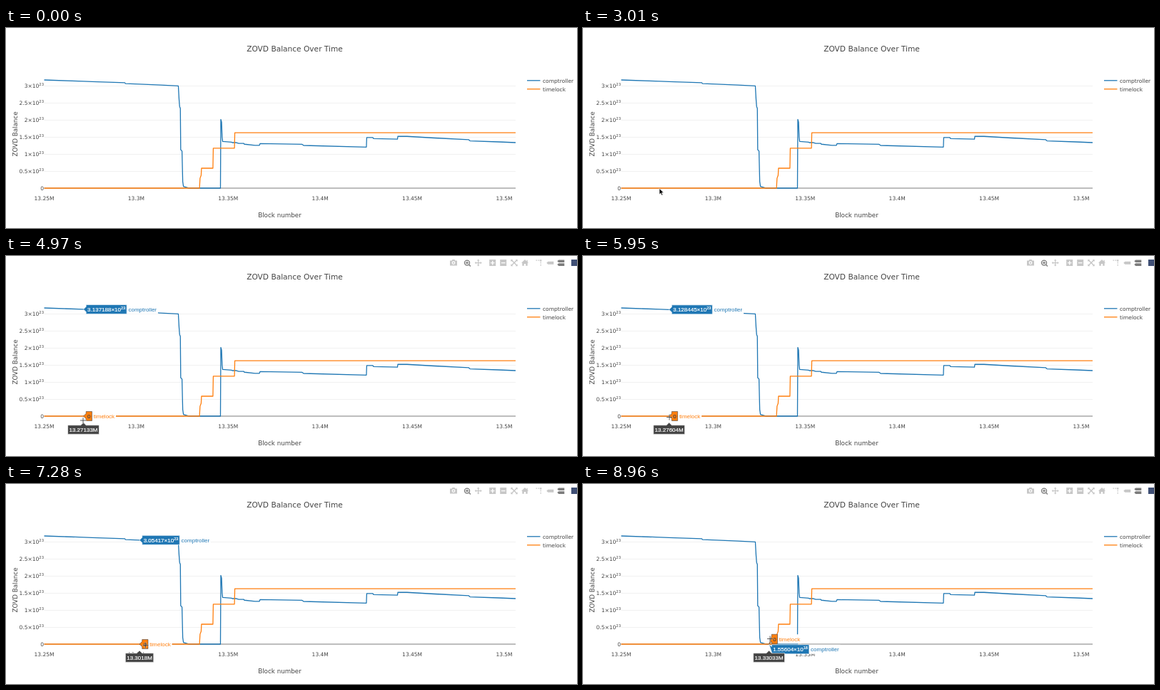
An HTML page that plays this animation: 800x281 px, repeating every 9.03 s.

```html
<!DOCTYPE html>
<html lang="en">
<head>
<meta charset="utf-8">
<title>Balance chart</title>
<style>
  html, body { margin: 0; width: 100%; height: 100%; overflow: hidden; background: #fff; }
  svg { display: block; width: 100%; height: 100%; }
  text { font: 7.5px "DejaVu Sans", sans-serif; fill: #444; white-space: pre; }
  .axis { font-size: 8.75px; }
  .title { font-size: 10.6px; }
  .hover text { font: 8px "Liberation Sans", Arial, sans-serif; }
  .sup { font-size: 70%; }
  .line { fill: none; stroke-width: 1.3; stroke-linejoin: round; }
</style>
</head>
<body>
<svg id="stage" viewBox="0 0 800 281"></svg>
<script>
const LOOP = 9030, STEP = 70, HOVER_START = 4760;
const BLUE = '#1f77b4', ORANGE = '#ff7f0e', DARK = '#444';
const stage = document.getElementById('stage');

// Points are [thousands of blocks after 13.25M, balance / 1e23].
const comptroller = [
  [0, 3.177], [21.33, 3.137188], [26.04, 3.128445], [43.8, 3.095], [44.2, 3.068],
  [51.8, 3.05417], [63.43, 3.029263], [72.9, 3], [73.3, 2.61], [73.6, 2.4],
  [74, 2.34], [74.2, 1.13], [74.9, 1.09], [75.3, .19], [75.7, .05], [77, .03],
  [78.6, 1.6e-5], [80.33, 1.55604e-5], [95.8, 0], [96, 2.02], [96.4, 1.94],
  [96.7, 1.5], [97, 1.37], [101.8, 1.352], [102.2, 1.337], [104.2, 1.34],
  [105.7, 1.316], [108.4, 1.316], [108.8, 1.29], [114.6, 1.258], [117, 1.258],
  [117.3, 1.308], [140.2, 1.287], [141, 1.254], [175.1, 1.206], [175.3, 1.488],
  [178.6, 1.488], [179, 1.454], [192, 1.438], [192.2, 1.521], [197.2, 1.52],
  [212, 1.473], [230.6, 1.425], [231.4, 1.388], [246.9, 1.358], [256.2, 1.337]
];
const timelock = [
  [0, 0], [84.4, 0], [84.7, .29], [85.3, .376], [85.5, .585], [91.7, .585],
  [91.9, 1.175], [103.4, 1.175], [103.6, 1.626], [256.2, 1.626]
];

// Time keys in ms.
const hoverKeys = [[4970, 21.33], [5950, 26.04], [7280, 51.8], [7910, 63.43], [8960, 80.33]];
const crossX = [[4970, 108], [5950, 121], [7280, 195.5], [7910, 217], [8960, 262]];
const crossY = [[4970, 231], [5950, 226.5], [7280, 226.5], [7910, 228], [8960, 217.5]];
const arrowX = [[1470, 98], [2310, 103], [2870, 107]];
const arrowY = [[1470, 279], [2310, 253], [2870, 225.5]];

const px = k => 53.5 + 2.578 * k;
const py = v => 225 - 47.85 * v;

function lerpAt(keys, t) {
  if (t <= keys[0][0]) return keys[0][1];
  for (let i = 1; i < keys.length; i++) {
    const [t0, a] = keys[i - 1], [t1, b] = keys[i];
    if (t <= t1) return a + (b - a) * (t - t0) / (t1 - t0);
  }
  return keys[keys.length - 1][1];
}

function el(parent, tag, attrs = {}, text) {
  const node = document.createElementNS('http://www.w3.org/2000/svg', tag);
  setAttrs(node, attrs);
  if (text !== undefined) node.textContent = text;
  return parent.appendChild(node);
}

function setAttrs(node, attrs) {
  for (const name in attrs) node.setAttribute(name, attrs[name]);
}

function setPower(node, base, exp) {
  node.textContent = exp === '' ? base : base + '×10';
  if (exp !== '') el(node, 'tspan', { class: 'sup', dy: -3.2 }, exp);
}

const trim = s => s.replace(/\.?0+$/, '');

function drawChart() {
  el(stage, 'rect', { width: 800, height: 281, fill: '#fff' });
  for (let v = 0; v <= 3; v += .5) {
    const y = Math.floor(py(v)) + .5;
    if (v) el(stage, 'path', { d: `M53.5 ${y}H714`, stroke: '#eee', 'stroke-width': .8 });
    const label = el(stage, 'text', { x: 53, y: py(v) + 3, 'text-anchor': 'end' });
    setPower(label, String(v), v ? '23' : '');
  }
  el(stage, 'path', { d: 'M53.5 225H714', stroke: DARK, 'stroke-width': .7 });
  for (let k = 0; k <= 250; k += 50) {
    el(stage, 'text', { x: px(k), y: 242, 'text-anchor': 'middle' }, 13.25 + k / 1000 + 'M');
  }
  const mid = { 'text-anchor': 'middle' };
  el(stage, 'text', { ...mid, class: 'title', x: 404.5, y: 33.3 }, 'ZOVD Balance Over Time');
  el(stage, 'text', { ...mid, class: 'axis', x: 383.5, y: 266 }, 'Block number');
  el(stage, 'text', { ...mid, class: 'axis', transform: 'translate(16 149) rotate(-90)' }, 'ZOVD Balance');

  [[comptroller, BLUE, 'comptroller'], [timelock, ORANGE, 'timelock']].forEach(([data, color, name], i) => {
    const d = 'M' + data.map(([k, v]) => px(k).toFixed(2) + ' ' + py(v).toFixed(2)).join('L');
    el(stage, 'path', { class: 'line', d, stroke: color });
    const y = 73.8 + 12 * i;
    el(stage, 'path', { class: 'line', d: `M730 ${y}h18.5`, stroke: color });
    el(stage, 'text', { x: 752, y: y + 2.7 }, name);
  });
}

function drawModebar() {
  const bar = el(stage, 'g');
  const icon = (x, d, color = '#c7c7c7') =>
    el(bar, 'path', { d, fill: color, 'fill-rule': 'evenodd', transform: `translate(${x} 9.6)` });
  const ring = r => `M${-r} 0a${r} ${r} 0 1 0 ${2 * r} 0a${r} ${r} 0 1 0 ${-2 * r} 0z`;
  const box = 'M-4.5-4.5h9v9h-9z';
  const tag = (y, h) => `M-5 ${y}l2 ${-h / 2}h8v${h}h-8z`;
  icon(627, 'M-5-3h2.5l1-1.5h3l1 1.5h2.5v7h-10z' + ring(2.4) + ring(1.2));
  icon(646, ring(4.2) + ring(2.8) + 'M-.6-2h1.2v1.4h1.4v1.2h-1.4v1.4h-1.2v-1.4h-1.4v-1.2h1.4zM2.4 3.4l1-1 2 2-1 1z', '#7c7c7c');
  icon(661.7, 'M0-5l1.8 2h-1.2v2.4h2.4v-1.2l2 1.8-2 1.8v-1.2h-2.4v2.4h1.2l-1.8 2-1.8-2h1.2v-2.4h-2.4v1.2l-2-1.8 2-1.8v1.2h2.4v-2.4h-1.2z');
  icon(681.7, box + 'M-.7-2.8h1.4v2.1h2.1v1.4h-2.1v2.1h-1.4v-2.1h-2.1v-1.4h2.1z');
  icon(696.7, box + 'M-2.8-.7h5.6v1.4h-5.6z');
  icon(712, 'M-4.7-4.7h3l-1 1 2.7 2.7 2.7-2.7-1-1h3v3l-1-1-2.7 2.7 2.7 2.7 1-1v3h-3l1-1-2.7-2.7-2.7 2.7 1 1h-3v-3l1 1 2.7-2.7-2.7-2.7-1 1z');
  icon(727, 'M-5 .2l5-4.7 2.5 2.3v-1.6h1.3v2.8l1.2 1.2h-1.3v4h-2.5v-2.7h-2.4v2.7h-2.5v-4z');
  icon(746.5, 'M-4-4h1.7v1.2h-1.7zM-1-4h1.8v1.2h-1.8zM1.5-4.4h2.4v2.4h-2.4zM2.1-1h1.2v2h-1.2zM2.1 2.2h1.2v2h-1.2z');
  icon(762.3, tag(.2, 4));
  icon(777.3, tag(-2.3, 3.6) + tag(2.5, 3.6), '#7c7c7c');
  el(bar, 'rect', { x: 792, y: 5, width: 9, height: 9, fill: '#3f4f75' });
  return bar;
}

function makeLabel(parent, name, fill, ink, border) {
  const g = el(parent, 'g');
  const back = el(g, 'rect', { fill: '#fff', height: 13 });
  const shape = el(g, 'path', { fill, stroke: border, 'stroke-width': .6 });
  const value = el(g, 'text', { x: 5.6, style: `fill:${ink};stroke:${ink};stroke-width:.2px` });
  const tail = el(g, 'text', { style: `fill:${fill}` }, name);
  return (x, y, dy, base, exp) => {
    setAttrs(g, { transform: `translate(${x} ${y})` });
    setPower(value, base, exp);
    const w = value.getComputedTextLength() + 3.8, end = 3.7 + w;
    setAttrs(shape, { d: `M0 0L3.7 ${dy + 3.7}V${dy + 6.5}h${w}V${dy - 6.5}H3.7V${dy - 3.7}Z` });
    setAttrs(value, { y: dy + 2.9 });
    setAttrs(tail, { x: end + 2.3, y: dy + 2.9 });
    setAttrs(back, { x: end, y: dy - 6.5, width: tail.getComputedTextLength() + 4.2 });
  };
}

function makeAxisLabel(parent) {
  const g = el(parent, 'g');
  const shape = el(g, 'path', { fill: DARK, stroke: '#fff', 'stroke-width': .6 });
  const text = el(g, 'text', { y: 246.8, 'text-anchor': 'middle', style: 'fill:#fff;stroke:#fff;stroke-width:.2px' });
  return (x, label) => {
    setAttrs(g, { transform: `translate(${x} 0)` });
    text.textContent = label;
    const half = text.getComputedTextLength() / 2 + 1.9;
    setAttrs(shape, { d: `M0 234l3.7 3.7H${half}v12.7H${-half}v-12.7H-3.7Z` });
  };
}

drawChart();
const modebar = drawModebar();
const hover = el(stage, 'g', { class: 'hover' });
const blueLabel = makeLabel(hover, 'comptroller', BLUE, '#fff', '#fff');
const orangeLabel = makeLabel(hover, 'timelock', ORANGE, DARK, DARK);
const axisLabel = makeAxisLabel(hover);
const cross = el(stage, 'g');
el(cross, 'path', { d: 'M-4.5 0h9M0-4.5v9', stroke: '#fff', 'stroke-width': 1.6, opacity: .6 });
el(cross, 'path', { d: 'M-4 0h8M0-4v8', stroke: '#333', 'stroke-width': .8 });
const arrow = el(stage, 'path', {
  d: 'M0 0V8.3L1.9 6.6 3.2 9.6 4.7 9 3.4 6H6Z', stroke: '#fff', 'stroke-width': .6
});

const show = (node, on) => node.setAttribute('display', on ? 'inline' : 'none');
const place = (node, xs, ys, t) =>
  node.setAttribute('transform', `translate(${lerpAt(xs, t)} ${lerpAt(ys, t)})`);

function render(t) {
  const hovering = t >= HOVER_START;
  show(arrow, t >= arrowX[0][0] && !hovering);
  show(hover, hovering);
  show(cross, hovering);
  modebar.setAttribute('opacity', Math.max(0, Math.min(1, (t - HOVER_START + STEP) / 280)));
  if (!hovering) return place(arrow, arrowX, arrowY, t);

  place(cross, crossX, crossY, t);
  const k = lerpAt(hoverKeys, t), x = px(k);
  const v = lerpAt(comptroller, k), y = py(v);
  const [base, exp] = (v * 1e23).toExponential(6).split('e+');
  const overlap = Math.max(0, 14.5 - (225 - y));
  const mid = (225 + y) / 2;
  const crowded = overlap > 0;
  blueLabel(x, y, crowded ? mid + 7.25 - y : 0, trim(base), exp);
  orangeLabel(x, 225, crowded ? mid - 7.25 - 225 : 0, '0', '');
  axisLabel(x, trim((13.25 + k / 1000).toFixed(5)) + 'M');
}

function tick() {
  const t = performance.now() % LOOP;
  render(Math.floor(t / STEP) * STEP);
  requestAnimationFrame(tick);
}
tick();
</script>
</body>
</html>
```
